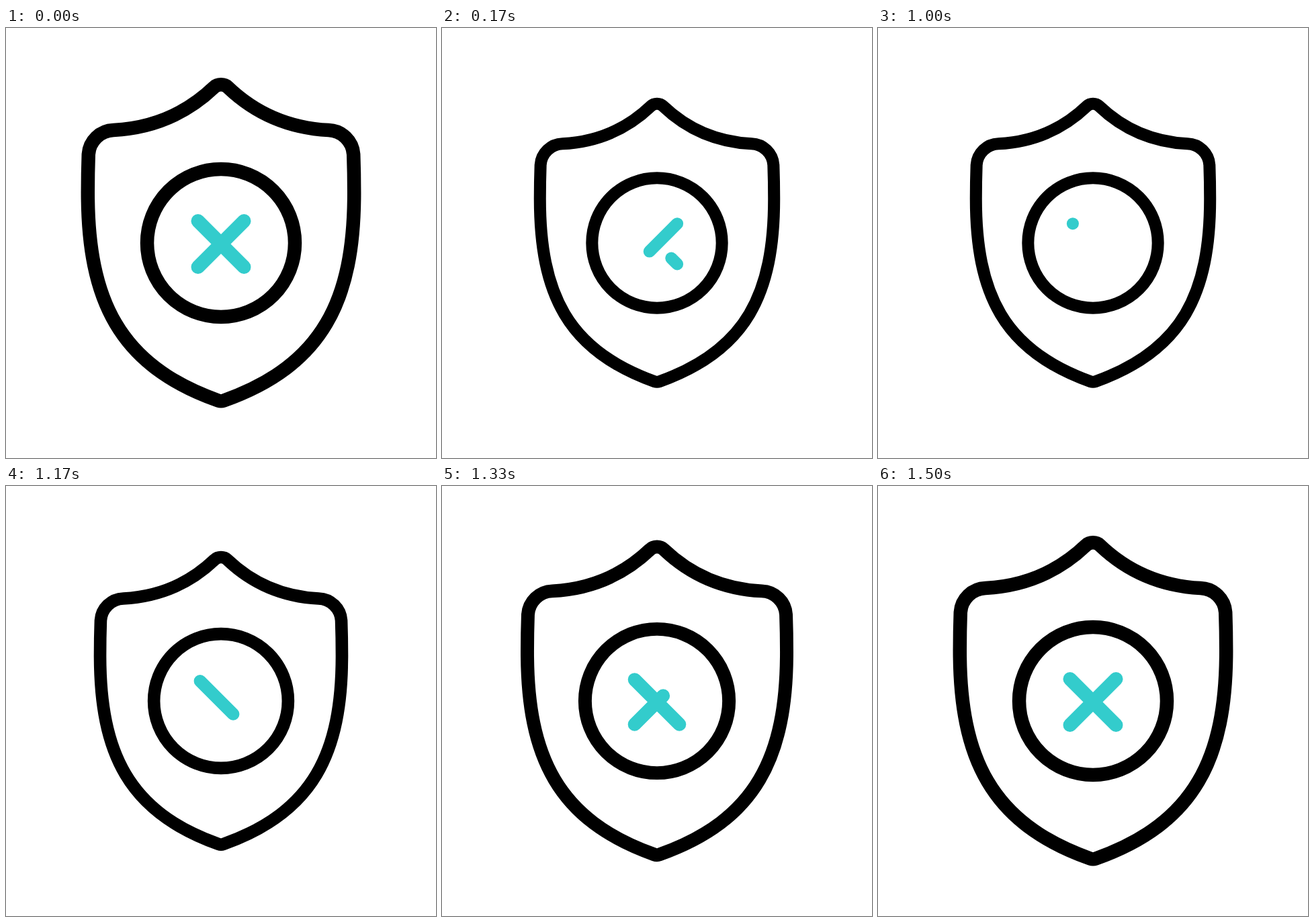
An HTML page for the animation above (2040 ms loop, 640 by 640 pixels).

```html
<!DOCTYPE html>
<html lang="en">
<head>
<meta charset="utf-8">
<title>Shield</title>
<style>
  html, body { margin: 0; width: 100%; height: 100%; overflow: hidden; background: #fff; }
  svg { display: block; width: 100%; height: 100%; }
  g { fill: none; stroke: #000; stroke-width: 20.5; stroke-linecap: round; stroke-linejoin: round; }
  line { stroke: #3cc; }
</style>
</head>
<body>
<svg viewBox="0 0 640 640">
  <g id="icon">
    <path d="M309.7 88.2 C315 83 325 83 330.3 88.2
      C373 129 422 149 480 152 A38.5 38.5 0 0 1 517.2 188
      Q518.2 216 518.2 245 C518.2 405 472 502 324 554.6 Q320 556 316 554.6
      C168 502 121.8 405 121.8 245 Q121.8 216 122.8 188
      A38.5 38.5 0 0 1 160 152 C218 149 267 129 309.7 88.2Z"/>
    <circle cx="320" cy="320" r="110"/>
    <line id="down"/>
    <line id="up"/>
  </g>
</svg>
<script>
const LOOP = 2040;
const FRAME = 1000 / 24;
const SMALL = 0.879;
const ARM = 34.25;
const CENTER = { x: 320, y: 321.5 };

const icon = document.getElementById('icon');

// Times are in steps of 1/24 s; dir is the vertical direction of the stroke.
const strokes = [
  { el: document.getElementById('down'), dir: 1, erase: [0, 5.45], draw: [24, 29.85] },
  { el: document.getElementById('up'), dir: -1, erase: [2.1, 7], draw: [28.6, 34.45] }
];

// Cubic ease-in-out with control points (.42, 0) and (.58, 1).
function ease(x) {
  if (x <= 0) return 0;
  if (x >= 1) return 1;
  let lo = 0, hi = 1, s = 0.5;
  for (let i = 0; i < 24; i++) {
    s = (lo + hi) / 2;
    const r = 1 - s;
    const at = 1.26 * r * r * s + 1.74 * r * s * s + s * s * s;
    if (at < x) lo = s; else hi = s;
  }
  return s * s * (3 - 2 * s);
}

const progress = (n, [from, to]) => ease((n - from) / (to - from));

function stepAt(ms) {
  const n = Math.round(ms / FRAME);
  const start = Math.round(n * FRAME / 10) * 10;
  return start > ms ? n - 1 : n;
}

function drawStroke({ el, dir, erase, draw }, n) {
  const drawing = n >= 24;
  const head = drawing ? progress(n, draw) : 1;
  const tail = drawing ? 0 : progress(n, erase);
  const visible = drawing ? n >= draw[0] : tail < 1;
  el.style.display = visible ? '' : 'none';
  [tail, head].forEach((p, i) => {
    const offset = ARM * (2 * p - 1);
    el.setAttribute('x' + (i + 1), CENTER.x + offset);
    el.setAttribute('y' + (i + 1), CENTER.y + dir * offset);
  });
}

function render(ms) {
  const n = stepAt(ms % LOOP);
  const size = n < 24 ? 1 - progress(n, [0, 3.15]) : progress(n, [24, 35.8]);
  const scale = SMALL + (1 - SMALL) * size;
  icon.setAttribute('transform', `translate(320 320) scale(${scale}) translate(-320 -320)`);
  strokes.forEach(s => drawStroke(s, n));
}

const began = performance.now();
function tick() {
  render(performance.now() - began);
  requestAnimationFrame(tick);
}
tick();
</script>
</body>
</html>
```
